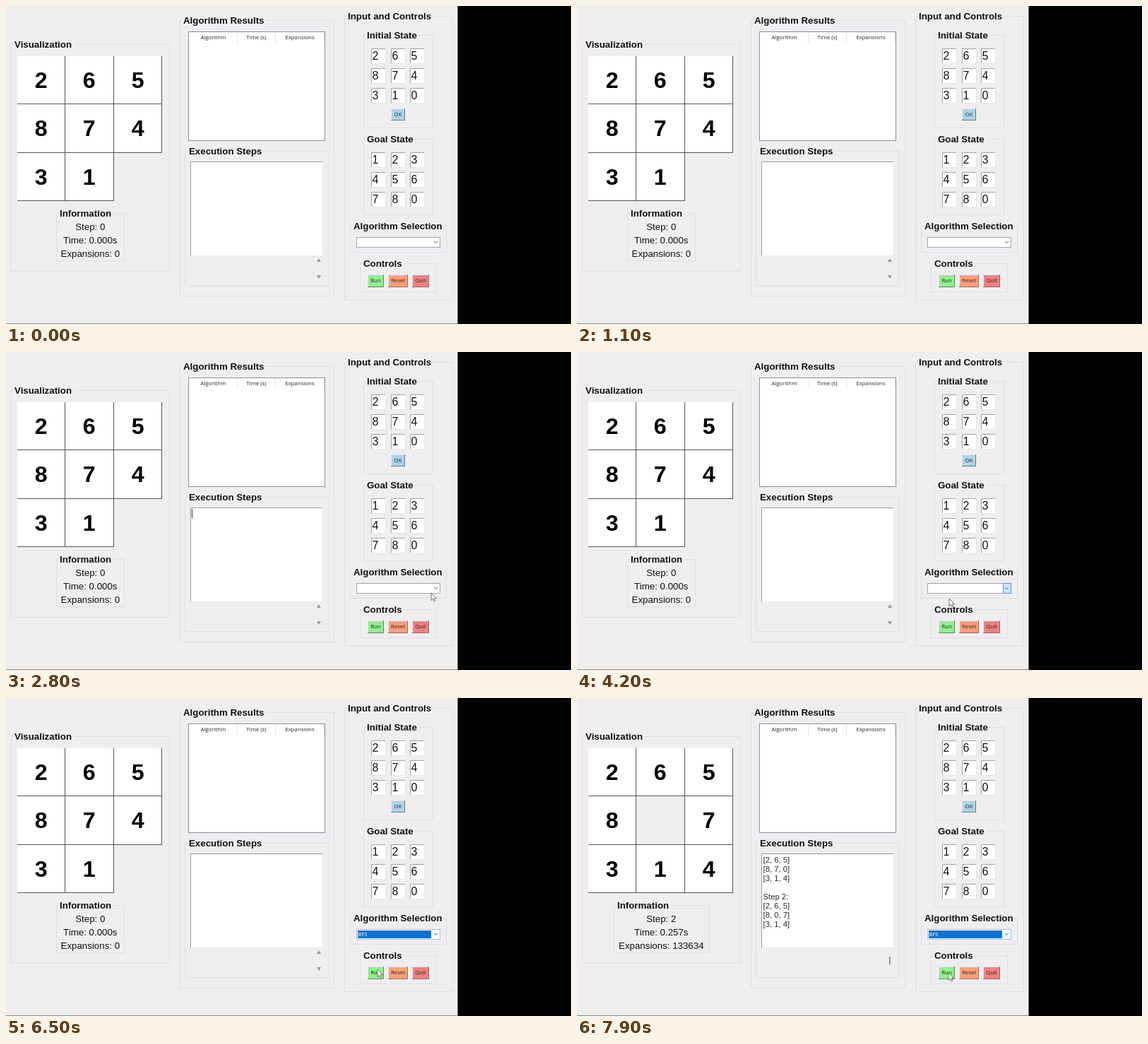
These frames come from a looping animation (800 by 450 pixels, 8 s). An HTML page:

```html
<!DOCTYPE html>
<html lang="en">
<head>
<meta charset="utf-8">
<title>8-puzzle solver</title>
<style>
html, body { margin: 0; width: 100%; height: 100%; overflow: hidden; background: #000; }
svg { display: block; width: 800px; height: 450px; }
text { font: 13.3px "Liberation Sans", Arial, sans-serif; white-space: pre; fill: #111; }
.title { font-weight: bold; }
.tile { font-size: 32.2px; font-weight: bold; fill: #000; }
.entry { font-size: 16px; }
.log { font-size: 11.25px; fill: #2a2a2a; }
.ui { font: 7.8px "Open Sans", "Noto Sans", sans-serif; fill: #222; }
</style>
</head>
<body>
<svg viewBox="0 0 800 450">
  <clipPath id="board"><rect x="16" y="71" width="206" height="206"/></clipPath>
  <g id="still"></g>
  <g id="live"></g>
</svg>
<script>
const LOOP = 8000, TICK = 100, BG = '#efedf0', BLUE = '#1072cf';
const SIZE = { title: 13.3, info: 13.3, tile: 32.2, entry: 16, log: 11.25, ui: 7.8 };
const BOARDS = ['265874310', '265870314', '265807314'];
const GOAL = '123456780';
const POINTER = [ // time, x, y
  [1500, 590, -14], [2000, 567, 207], [2800, 602, 341], [3300, 607, 334],
  [3600, 607, 334], [4200, 527, 349], [5700, 527, 349], [6200, 526, 385],
  [6500, 526, 384], [7100, 526, 389]
];

const rect = (x0, y0, x1, y1, fill, stroke = 'none') =>
  `<rect x="${x0}" y="${y0}" width="${x1 - x0}" height="${y1 - y0}" fill="${fill}" stroke="${stroke}"/>`;
const path = (d, stroke, fill = 'none', more = '') =>
  `<path d="${d}" stroke="${stroke}" fill="${fill}" ${more}/>`;

// y is the middle of the capitals
const label = (s, x, y, kind, anchor = 'middle', more = '') =>
  `<text class="${kind}" x="${x}" y="${y + SIZE[kind] * 0.358}" text-anchor="${anchor}" ${more}>${s}</text>`;

function group(title, x0, y0, x1, y1, titleWidth, pad = 5) {
  return rect(x0 + .5, y0 + .5, x1 - .5, y1 - .5, 'none', '#dfdddf') +
    rect(x0 + pad - 1, y0 - 7, x0 + pad + titleWidth + 1, y0 + 8, BG) +
    label(title, x0 + pad, y0 + .2, 'title', 'start');
}

function bevel(x0, y0, x1, y1, fill, light, dark) {
  return rect(x0, y0, x1, y1, fill) +
    path(`M${x0 + .5} ${y1}V${y0 + .5}H${x1}`, light) +
    path(`M${x0} ${y1 - .5}H${x1 - .5}V${y0}`, dark);
}

const button = (s, x0, y0, x1, y1, fill) =>
  bevel(x0, y0, x1, y1, fill, '#e8e8e8', '#777') + label(s, (x0 + x1) / 2, y0 + 8.4, 'ui');

const entries = (digits, top) => [...digits].map((d, i) => {
  const x = 517 + Math.round(i % 3 * 27.7), y = top + Math.floor(i / 3) * 28;
  return bevel(x, y, x + 21, y + 22, '#fff', '#a2a2a2', '#e6e6e6') +
    label(d, x + 1.4, y + 10.7, 'entry', 'start');
}).join('');

function stillParts() {
  return rect(0, 0, 639.5, 450, BG) + rect(0, 449, 639.5, 450, '#8a8a8a') +
    group('Visualization', 7, 54, 232, 376, 82) +
    group('Algorithm Results', 246, 20, 465, 411, 114) +
    group('Execution Steps', 253, 205, 457, 396, 104, 6) +
    group('Input and Controls', 479, 14, 633, 416, 119) +
    group('Initial State', 506, 41, 605, 173, 71) +
    group('Goal State', 506, 188, 605, 296, 67) +
    group('Algorithm Selection', 487, 311, 624, 349, 126) +
    group('Controls', 501, 364, 610, 405, 56) +
    rect(258.5, 36.5, 451.5, 190.5, '#fff', '#8c9096') +
    path('M327.5 37V52M381.5 37V52M450.5 37V52', '#e3e3e3') +
    label('Algorithm', 293.5, 44.6, 'ui') +
    label('Time (s)', 354.5, 44.6, 'ui') +
    label('Expansions', 416, 44.6, 'ui') +
    bevel(261, 220, 449, 354, '#fff', '#999', '#e9e9e9') +
    entries(BOARDS[0], 60) + entries(GOAL, 207) +
    button('OK', 545, 145, 565, 162, '#a9d4e8') +
    button('Run', 512, 380, 535, 398, '#90ee90') +
    button('Reset', 541, 380, 569, 398, '#ffa07a') +
    button('Quit', 575, 380, 599, 398, '#f08080');
}

const edge = i => Math.round(i * 68.4);
const tiles = board => '<g clip-path="url(#board)">' + [...board].map((d, i) => {
  if (d === '0') return '';
  const col = i % 3, row = Math.floor(i / 3), x = 15.5 + edge(col), y = 70.5 + edge(row);
  return rect(x, y, 15.5 + edge(col + 1), 70.5 + edge(row + 1), '#fff', '#555') +
    label(d, x + 34.1, y + 33.5, 'tile');
}).join('') + '</g>';

function info(step) {
  const [x0, x1] = step ? [52, 187] : [71, 168];
  return group('Information', x0, 293, x1, 361, 74) +
    label('Step: ' + step, 119.3, 312, 'info') +
    label(`Time: ${step ? '0.257' : '0.000'}s`, 119.3, 331, 'info') +
    label('Expansions: ' + (step ? 133634 : 0), 119.3, 350.5, 'info');
}

function log(step) {
  const lines = [];
  for (let n = 1; n <= step; n++) {
    const rows = BOARDS[n].match(/.../g).map(r => `[${[...r].join(', ')}]`);
    lines.push(`Step ${n}:`, ...rows, '');
  }
  lines.push('');
  const bar = lines.length > 10
    ? rect(442.2, 366, 443.6, 377, '#666')
    : path('M440 362L443 357L446 362ZM440 381L443 386L446 381Z', 'none', '#999');
  return bar + lines.slice(-10).map((s, i) => label(s, 263.6, 228.6 + i * 13.05, 'log', 'start')).join('');
}

function combo(open, chosen) {
  return rect(496.5, 327.5, 614.5, 341.5, '#fff', chosen ? '#9dbfe0' : '#a6a6a6') +
    (open ? rect(603.5, 327.5, 614.5, 341.5, '#cce4f7', '#4a9ade') : '') +
    (chosen ? rect(498, 329, 602, 340, BLUE) +
      label('BFS', 498.3, 334.7, 'ui', 'start', 'style="fill:#fff"') : '') +
    path('M606 333L608.5 335.5L611 333', '#555');
}

function pointer(t) {
  if (t < POINTER[0][0]) return '';
  const next = POINTER.findIndex(p => p[0] > t);
  let [, x, y] = POINTER[POINTER.length - 1];
  if (next > 0) {
    const [t0, x0, y0] = POINTER[next - 1], [t1, x1, y1] = POINTER[next];
    const k = (t - t0) / (t1 - t0), e = k * k * (3 - 2 * k);
    x = x0 + (x1 - x0) * e;
    y = y0 + (y1 - y0) * e;
  }
  return path('M0 0V10.5L2.5 8.3L4.1 12L5.8 11.3L4.2 7.6H7.6Z', '#555', '#fff',
    `stroke-width=".8" transform="translate(${x} ${y})"`);
}

function draw(t) {
  const step = t < 7400 ? 0 : t < 7900 ? 1 : 2;
  const caret = t >= 1900 && t < 3400 && (t - 1900) % 900 < 600;
  return tiles(BOARDS[step]) + info(step) + log(step) +
    (caret ? rect(263, 222, 264, 235, '#333') : '') +
    combo(t >= 3400 && t < 5900, t >= 5900) + pointer(t);
}

const live = document.getElementById('live');
document.getElementById('still').innerHTML = stillParts();
const start = performance.now();
let last = -1;
function frame() {
  const t = Math.floor((performance.now() - start) % LOOP / TICK) * TICK;
  if (t !== last) live.innerHTML = draw(last = t);
  requestAnimationFrame(frame);
}
frame();
</script>
</body>
</html>
```
